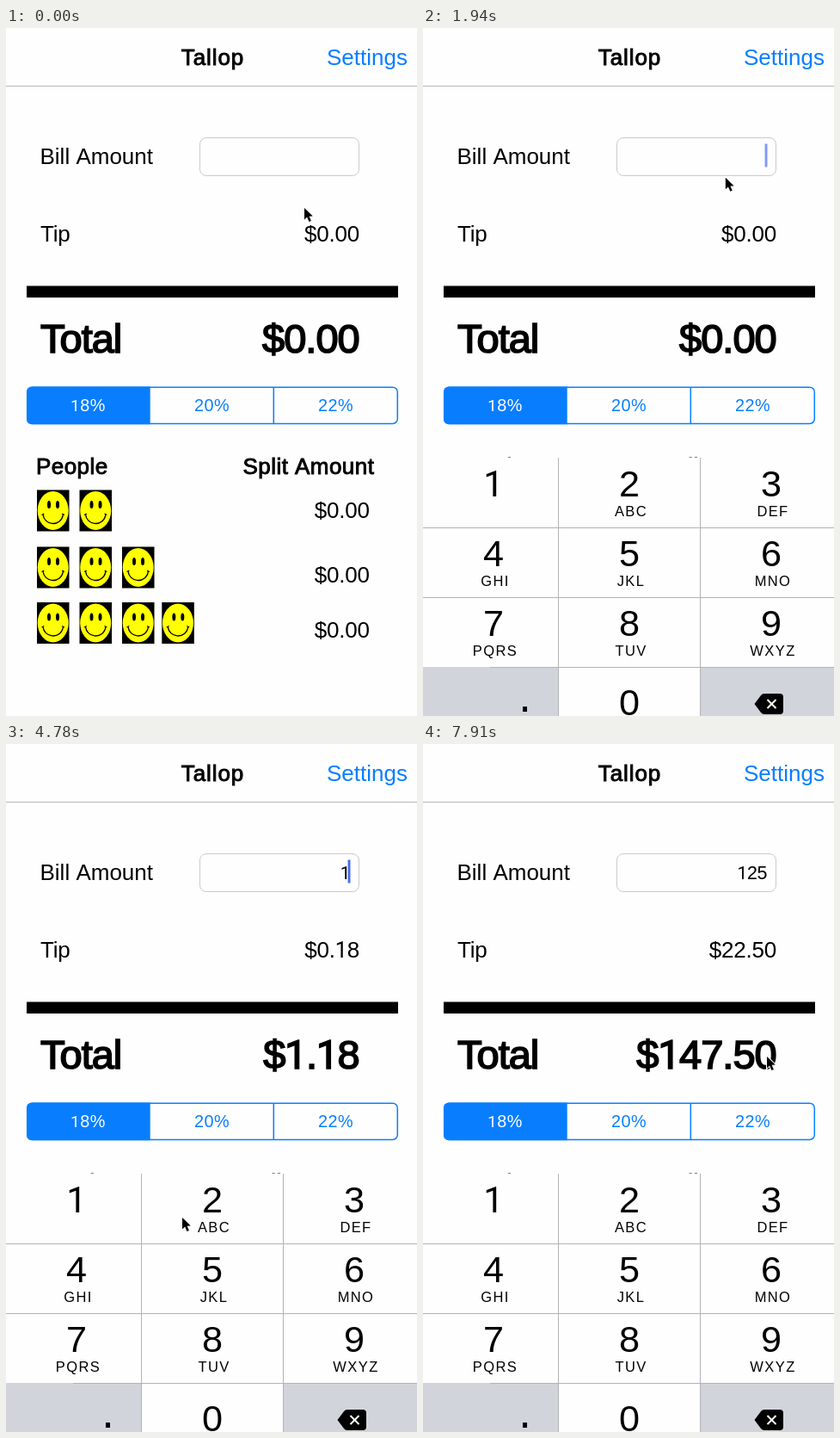
Write an HTML page with a canvas that moves like this. It is 478 px wide and 799 px high and loops after 8000 ms.

```html
<!DOCTYPE html>
<html lang="en">
<head>
<meta charset="utf-8">
<title>Tip calculator</title>
<style>
html, body { margin: 0; width: 100%; height: 100%; overflow: hidden; background: #fefefe; }
canvas { display: block; }
</style>
</head>
<body>
<canvas id="stage" width="478" height="799"></canvas>
<script>
const ctx = document.getElementById('stage').getContext('2d');
const LOOP = 8000, STEP = 149.25;
const BLUE = '#087eff', PAPER = '#fefefe', GREY = '#d1d5db', LINE = '#b3b3b6';
const LEFT = 0, CENTER = 0.5, RIGHT = 1;

// Pointer stops: step, x, y
const path = [
  [0, 347, 209], [4, 342, 154], [6, 342, 154], [7, 351, 152], [10, 351, 151],
  [14, 352, 178], [18, 352, 178], [25, 144, 530], [27, 111, 539], [29, 111, 539],
  [32, 205, 550], [34, 226, 554], [37, 228, 554], [39, 234, 631], [41, 234, 631],
  [43, 245, 630], [45, 259, 629], [46, 259, 629], [47, 270, 642], [53, 400, 363]
];
// Key taps: step, key index
const taps = [[29, 0], [35, 1], [40, 4]];
const FOCUS = 9;
const letters = ['', 'ABC', 'DEF', 'GHI', 'JKL', 'MNO', 'PQRS', 'TUV', 'WXYZ'];
const columns = [82, 240, 405], edges = [0, 157.5, 322.5, 478];

const clamp = v => Math.max(0, Math.min(1, v));
const money = v => '$' + v.toFixed(2);

function rect(x, y, w, h, color) {
  ctx.fillStyle = color;
  ctx.fillRect(x, y, w, h);
}

function line(x1, y1, x2, y2, color, width = 1) {
  ctx.strokeStyle = color;
  ctx.lineWidth = width;
  ctx.beginPath();
  ctx.moveTo(x1, y1);
  ctx.lineTo(x2, y2);
  ctx.stroke();
}

function ellipse(x, y, rx, ry, color) {
  ctx.fillStyle = color;
  ctx.beginPath();
  ctx.ellipse(x, y, rx, ry, 0, 0, 7);
  ctx.fill();
}

// The digit 1 uses a face whose 1 has no foot; medium weight is a thin outline
function text(s, x, y, size, { align = LEFT, medium = false, color = '#000', gap = 0 } = {}) {
  ctx.fillStyle = ctx.strokeStyle = color;
  ctx.lineWidth = size * 0.036;
  ctx.lineJoin = 'miter';
  ctx.letterSpacing = gap + 'px';
  const runs = (s.match(/1+|[^1]+/g) || []).map(part => {
    const font = part[0] === '1'
      ? `${size * 0.97}px Roboto, sans-serif`
      : `${size}px "Liberation Sans", Arial, sans-serif`;
    ctx.font = font;
    return { part, font, width: ctx.measureText(part).width };
  });
  x -= align * runs.reduce((sum, r) => sum + r.width, 0);
  for (const r of runs) {
    ctx.font = r.font;
    ctx.fillText(r.part, x, y);
    if (medium) ctx.strokeText(r.part, x, y);
    x += r.width;
  }
}

function face(x, y) {
  ctx.save();
  ctx.translate(x, y);
  rect(0, 0, 37.5, 48, '#000');
  ellipse(18.7, 24, 18, 22.4, '#ff0');
  ellipse(14, 17, 2, 4.6, '#000');
  ellipse(24, 17, 2, 4.6, '#000');
  ctx.strokeStyle = '#000';
  ctx.lineWidth = 1.3;
  ctx.beginPath();
  ctx.ellipse(18.7, 27.5, 11.7, 11.5, 0, 0.1, Math.PI - 0.1);
  ctx.stroke();
  line(5.5, 29, 8.3, 27.5, '#000', 1.1);
  line(29.1, 27.5, 31.9, 29, '#000', 1.1);
  ctx.restore();
}

function segments() {
  ctx.strokeStyle = BLUE;
  ctx.lineWidth = 1.5;
  ctx.beginPath();
  ctx.roundRect(24.7, 417.2, 430.6, 42.3, 5.5);
  ctx.stroke();
  ctx.fillStyle = BLUE;
  ctx.beginPath();
  ctx.roundRect(24, 416.5, 143.7, 43.7, [6, 0, 0, 6]);
  ctx.fill();
  line(311.3, 417, 311.3, 460, BLUE, 1.5);
  ['18%', '20%', '22%'].forEach((s, i) =>
    text(s, 95.5 + 144 * i, 445, 19.8, { align: CENTER, color: i ? BLUE : '#fff', gap: 0.5 }));
}

function page(bill, caret) {
  const tip = bill * 0.18;
  rect(0, 0, 478, 799, PAPER);
  line(0, 67.5, 478, 67.5, '#b6b6b6');
  text('Tallop', 240.5, 43, 26, { align: CENTER, medium: true, gap: 0.9 });
  text('Settings', 373, 43, 26, { color: BLUE });

  text('Bill Amount', 39.5, 158, 26);
  ctx.strokeStyle = '#cbcbcb';
  ctx.lineWidth = 1;
  ctx.beginPath();
  ctx.roundRect(225.5, 127.5, 185, 44, 7.5);
  ctx.stroke();
  if (bill) text(String(bill), 400.3, 156.5, 21.4, { align: RIGHT, gap: -0.2 });
  ctx.globalAlpha = caret;
  rect(397.6, 134.5, 2.9, 27, '#466bee');
  ctx.globalAlpha = 1;

  text('Tip', 40, 248, 26, { gap: -0.2 });
  text(money(tip), 411, 248, 26, { align: RIGHT, gap: -0.2 });
  rect(24, 299.5, 432, 13.5, '#000');
  text('Total', 40, 377, 47, { medium: true, gap: -1 });
  text(money(bill + tip), 410.7, 377, 47, { align: RIGHT, medium: true, gap: -1 });
  segments();

  text('People', 35, 518, 26, { medium: true, gap: 0.45 });
  text('Split Amount', 275.5, 518, 26, { medium: true, gap: 0.45 });
  [[536.5, 569], [602.5, 644], [667, 708]].forEach(([top, base], row) => {
    [36, 85.5, 135, 181.3].slice(0, row + 2).forEach(x => face(x, top));
    text(money(0), 422.7, base, 26, { align: RIGHT, gap: -0.2 });
  });
}

function backspace() {
  ctx.fillStyle = '#000';
  ctx.beginPath();
  ctx.moveTo(385.5, 785);
  ctx.lineTo(393, 775);
  ctx.quadraticCurveTo(394.5, 773, 397, 773);
  ctx.lineTo(415, 773);
  ctx.quadraticCurveTo(419, 773, 419, 777);
  ctx.lineTo(419, 793);
  ctx.quadraticCurveTo(419, 797, 415, 797);
  ctx.lineTo(397, 797);
  ctx.quadraticCurveTo(394.5, 797, 393, 795);
  ctx.fill();
  line(400.5, 780, 410.5, 790, '#fff', 2);
  line(410.5, 780, 400.5, 790, '#fff', 2);
}

function keyboard(drop, pressed) {
  ctx.save();
  ctx.translate(0, drop);
  rect(0, 499, 478, 322, PAPER);
  rect(0, 742, 157.5, 79, GREY);
  rect(322.5, 742, 155.5, 79, GREY);
  if (pressed >= 0) {
    const c = pressed % 3, r = Math.floor(pressed / 3);
    rect(edges[c], 499 + 81 * r, edges[c + 1] - edges[c], 81, GREY);
  }
  for (const x of [157.5, 322.5]) line(x, 499, x, 821, LINE);
  for (const y of [580.5, 661.5]) line(0, y, 478, y, LINE);
  line(78, 742.5, 478, 742.5, LINE);
  letters.forEach((s, i) => {
    const x = columns[i % 3], y = 544 + 81 * Math.floor(i / 3);
    text(String(i + 1), x, y, 43.2, { align: CENTER });
    text(s, x + 2, y + 23, 16.5, { align: CENTER, gap: 1.4 });
  });
  text('0', 240, 798, 43.2, { align: CENTER });
  rect(116, 788, 5, 6, '#000');
  backspace();
  ctx.restore();
}

function pointer(step) {
  const i = Math.max(1, path.findIndex(p => p[0] >= step));
  const [a, x1, y1] = path[i - 1], [b, x2, y2] = path[i];
  const u = clamp((step - a) / (b - a)), e = u * u * (3 - 2 * u);
  ctx.save();
  ctx.translate(x1 + (x2 - x1) * e, y1 + (y2 - y1) * e);
  ctx.beginPath();
  [[0, 0], [0, 13.5], [3.1, 10.6], [5.5, 16], [7.9, 15], [5.6, 9.8], [9.8, 9.6]]
    .forEach(p => ctx.lineTo(...p));
  ctx.closePath();
  ctx.strokeStyle = '#fff';
  ctx.lineWidth = 2;
  ctx.stroke();
  ctx.fillStyle = '#000';
  ctx.fill();
  ctx.restore();
}

// Caret is solid after each edit, then fades out and in
function caretAlpha(age) {
  if (age < 0) return 0;
  if (age < 525) return 1;
  const p = (age - 525) % 970;
  return p < 225 ? 1 - p / 225 : clamp((p - 450) / 225);
}

function draw(now) {
  const step = Math.floor((now % LOOP) / STEP + 0.07);
  const done = taps.filter(t => t[0] <= step);
  const bill = done.reduce((n, t) => n * 10 + t[1] + 1, 0);
  const last = done.length ? done[done.length - 1] : [FOCUS, -1];
  page(bill, caretAlpha((step - last[0]) * STEP));
  if (step >= FOCUS) {
    const left = 1 - clamp((step - FOCUS) * STEP / 537);
    keyboard(Math.round(322 * left ** 3), step === last[0] ? last[1] : -1);
  }
  pointer(step);
}

const start = performance.now();
function tick() {
  draw(performance.now() - start);
  requestAnimationFrame(tick);
}
tick();
</script>
</body>
</html>
```
